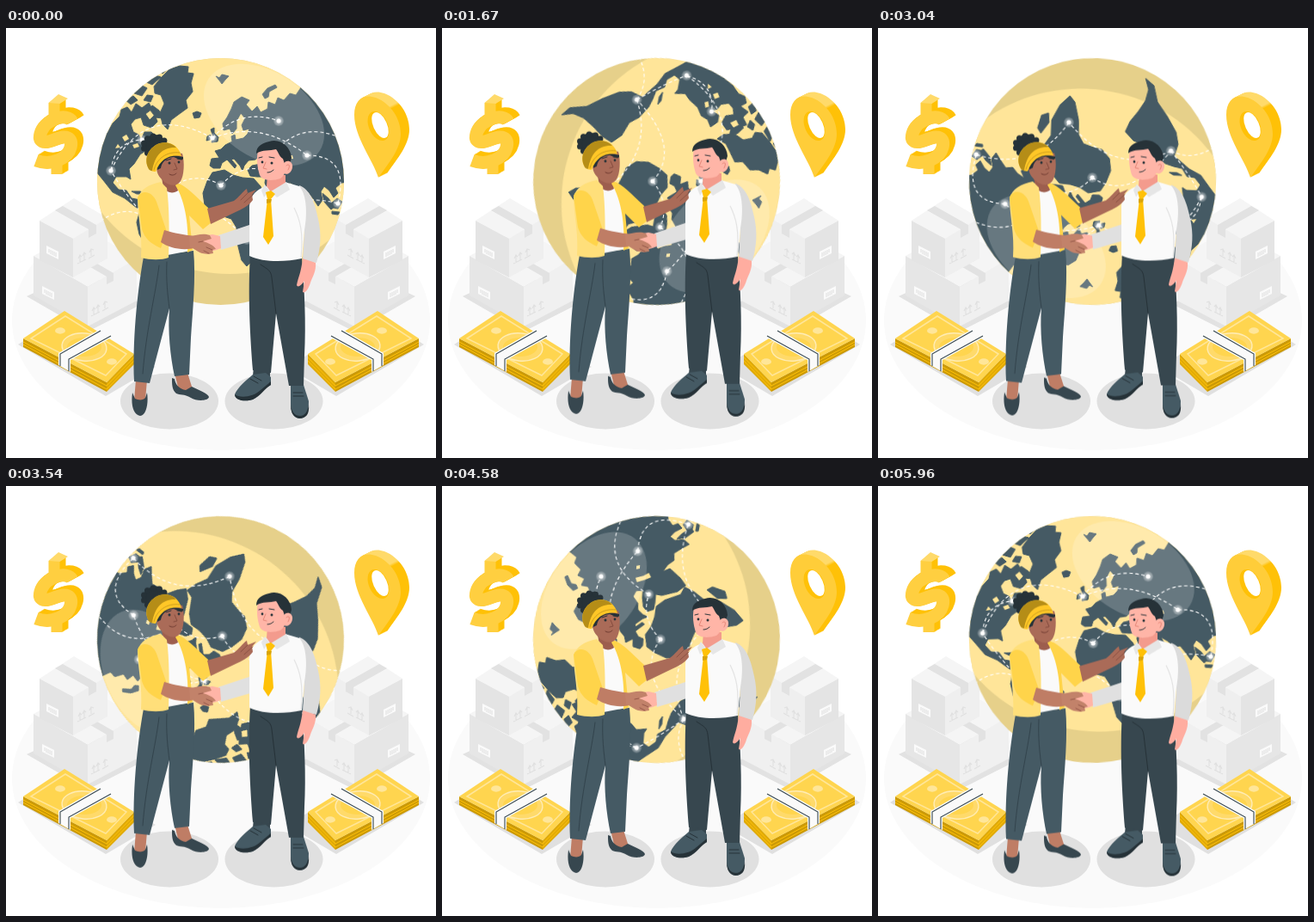
These frames come from a looping animation (500x500 px, 6000 ms). An HTML page:

```html
<!DOCTYPE html>
<html lang="en">
<head>
<meta charset="utf-8">
<title>Global trade handshake</title>
<style>
  html, body { margin: 0; width: 100%; height: 100%; overflow: hidden; background: #fff; }
  svg { display: block; width: 100vw; height: 100vh; }
  #globe { transform-origin: 249.5px 178.5px; }
  .land { fill: #455a64; stroke: #455a64; stroke-width: 1; stroke-linejoin: round; }
  .arc { fill: none; stroke: #fff; stroke-width: 1.1; stroke-dasharray: 4 3; }
  .line { fill: none; stroke: #263238; stroke-width: 1; stroke-linecap: round; stroke-linejoin: round; }
  .bold { fill: none; stroke-linecap: butt; stroke-linejoin: round; stroke-width: 15; }
</style>
</head>
<body>
<svg viewBox="0 0 500 500">
  <defs>
    <clipPath id="disc"><circle cx="249.5" cy="178.5" r="143.5"/></clipPath>
    <radialGradient id="glow">
      <stop offset="0" stop-color="#fff" stop-opacity=".85"/>
      <stop offset=".45" stop-color="#fff" stop-opacity=".5"/>
      <stop offset="1" stop-color="#fff" stop-opacity=".12"/>
    </radialGradient>
    <linearGradient id="pinSide" x1="0" y1="0" x2=".6" y2="1">
      <stop offset=".42" stop-color="#ffda6a"/>
      <stop offset=".46" stop-color="#ffc107"/>
    </linearGradient>
    <g id="marker">
      <circle r="6" fill="url(#glow)"/>
      <circle r="2.5" fill="#fff"/>
    </g>
    <g id="dollar" class="bold">
      <path d="M77 109C71 98 47 106 41 120C36 133 44 135 56 130C70 124 78 127 75 139C72 151 54 161 35 154"/>
      <path d="M56 87V105M59 150V170" stroke-width="13"/>
    </g>
    <path id="pin" d="M433 174C427 154 405 127 405 101C405 83 416 76 430 81C448 88 459 106 459 123C459 140 446 156 433 174Z"/>
    <g id="arrows" fill="none" stroke="#e0e0e0" stroke-width="1.1">
      <path d="M-8 5V-3M-10 0L-8 -4L-6 -2M-3 2V-6M-5 -3L-3 -7L-1 -5M5 -3V-11M3 -7L5 -11L8 -10M2 0L9 -4M-11 6L-1 1"/>
    </g>
    <g id="label">
      <path d="M-7 -8L7 -1V8L-7 1Z" fill="#fafafa"/>
      <path d="M-4 -4V0M-2 -3V2M0 -2V3M2 -1V4M4 0V5" stroke="#ddd" stroke-width=".9"/>
    </g>
    <g id="boxes">
      <path d="M24 312L95 353L158 321L88 282Z" fill="#e2e2e2"/>
      <path d="M32 265L92 233L152 268L95 301Z" fill="#f5f5f5"/>
      <path d="M32 265L95 301V347L32 311Z" fill="#e6e6e6"/>
      <path d="M95 301L152 268V317L95 347Z" fill="#f0f0f0"/>
      <path d="M55 253L63 249L125 285V294L117 298V289Z" fill="#e2e2e2"/>
      <use href="#label" x="49" y="308"/>
      <use href="#arrows" x="110" y="329"/>
      <path d="M39 224L79 198L118 221L78 245Z" fill="#f5f5f5"/>
      <path d="M39 224L78 245V290L39 270Z" fill="#e4e4e4"/>
      <path d="M78 245L118 221V268L78 290Z" fill="#efefef"/>
      <path d="M57 212L66 207L105 229V239L96 244V234Z" fill="#e2e2e2"/>
      <use href="#label" x="54" y="261"/>
      <use href="#arrows" x="94" y="268"/>
    </g>
    <g id="money">
      <path d="M14 368L68 334L174 394L116 428Z" fill="#e0e0e0"/>
      <path d="M20 361L117 412V423L20 371Z" fill="#cc9a06"/>
      <path d="M117 412L149 379V391L117 423Z" fill="#e0aa07"/>
      <path d="M20 365L117 416L149 383M20 368L117 420L149 387" fill="none" stroke="#ffc107" stroke-width="1"/>
      <path d="M20 361L68 329L149 379L117 412Z" fill="#ffd54f"/>
      <path d="M29 361L69 335L140 379L116 404Z" fill="none" stroke="#ffe699" stroke-width="1.5"/>
      <ellipse cx="91" cy="371" rx="26" ry="16" transform="rotate(6 91 371)" fill="#ffda6a" stroke="#ffecb3" stroke-width="1.5"/>
      <ellipse cx="91" cy="371" rx="20" ry="11" fill="#ffd54f"/>
      <ellipse cx="63" cy="352" rx="6" ry="3.700" fill="#ffe699"/>
      <ellipse cx="123" cy="388" rx="6" ry="3.700" fill="#ffe699"/>
      <path d="M108 351L124 359L75 386V400L61 392V378Z" fill="#fafafa"/>
      <path d="M110 352L63 379V393M122 358L73 385V399" fill="none" stroke="#37474f" stroke-width="1.1"/>
    </g>
  </defs>

  <ellipse cx="250" cy="340" rx="243" ry="151" fill="#fafafa"/>
  <use href="#boxes"/>
  <use href="#boxes" transform="matrix(-1 0 0 1 500 0)"/>

  <g id="globe">
    <circle cx="249.5" cy="178.5" r="143.5" fill="#e6d08a"/>
    <g clip-path="url(#disc)">
      <circle cx="260" cy="95" r="191" fill="#ffe599"/>
      <g class="land">
        <path d="M104 132L118 122L124 111L132 103L134 95L141 92L146 98L151 88L158 93L166 87L170 94L162 100L167 107L173 101L176 109L169 116L160 113L157 104L150 106L145 112L148 121L154 124L157 130L161 121L169 121L176 128L168 133L165 141L156 147L149 158L143 164L145 176L140 173L128 173L124 180L131 188L140 189L146 198L156 200L166 203L180 212L188 222L204 228L214 238L209 250L200 262L192 275L189 288L193 301L183 293L178 274L166 258L155 240L152 226L156 212L148 206L138 198L124 191L113 177L104 166Z"/>
        <path d="M172 68L180 58L190 48L202 44L212 45L211 52L218 53L215 64L217 74L209 84L211 93L200 101L192 107L188 118L182 112L179 99L184 88L180 78L173 76Z"/>
        <path d="M149 76L156 66L164 70L158 79ZM163 63L173 55L180 57L170 66ZM164 78L171 79L168 86L160 84ZM139 84L148 79L153 84L145 89ZM170 90L178 96L181 105L174 104L168 96ZM178 50L187 43L190 46L182 53Z"/>
        <path d="M217 99L222 97L227 99L225 104L219 105ZM244 56L248 58L251 54L259 56L255 60L251 65L248 61ZM301 82L298 77L304 70L313 66L315 69L306 74L305 80ZM146 190L156 190L161 193L152 193Z"/>
        <path d="M238 118L242 116L242 122L247 127L246 132L239 133L241 127ZM234 126L238 124L237 130L233 131ZM304 256L303 245L312 232L316 238L312 253Z"/>
        <path d="M253 119L252 111L257 104L262 94L265 86L274 80L283 84L279 89L286 97L292 91L296 98L304 94L305 86L313 89L316 81L323 84L330 76L337 78L343 69L404 100V178L390 180L383 186L386 192L381 197L376 189L370 184L366 190L368 200L363 207L357 198L351 190L343 191L337 184L329 179L333 187L323 200L315 207L307 198L301 180L302 173L292 173L284 172L281 165L286 160L296 158L305 158L304 150L297 147L290 153L282 154L277 160L275 166L272 160L265 152L262 153L268 160L266 163L257 153L251 157L249 163L241 163L237 160L239 152L248 151L243 143L250 141L255 136L263 132L262 126L266 124L267 130L276 128L281 123L283 117L276 119L274 113L278 105L273 99L268 108L268 117L263 123L260 117Z"/>
        <path d="M368 192L375 198L382 208L378 211L370 202ZM379 203L385 198L391 202L386 210L381 209ZM379 213L388 214L386 217L379 216Z"/>
        <path d="M240 168L254 165L264 171L275 174L288 175L296 184L304 202L313 206L308 218L300 230L300 248L291 266L280 277L274 270L269 250L268 232L262 222L250 218L240 216L231 206L229 192L234 178Z"/>
      </g>
      <path d="M135 127l5 -3l3 5l-5 3zM147 136l6 -2l2 4l-6 2zM127 140l3 -5l3 4zM314 150l5 -2l3 9l4 6l-5 3l-4 -8zM329 148l4 0l1 4l-4 0z" fill="#ffe599"/>
      <ellipse cx="300" cy="101" rx="77" ry="50" transform="rotate(33 300 101)" fill="#fff" opacity=".18"/>
      <g id="routes"></g>
    </g>
  </g>

  <g id="dollarSide" stroke="#ffc107"></g>
  <use href="#dollar" stroke="#ffcf40"/>
  <path d="M49.500 87L61 77L72 82L62.500 88Z" fill="#ffda6a"/>

  <g id="pinBack" fill="url(#pinSide)"></g>
  <use href="#pin" fill="#ffcd39"/>
  <ellipse cx="433" cy="114" rx="11" ry="18" transform="rotate(-24 433 114)" fill="#ffc107"/>
  <ellipse cx="435" cy="113" rx="8" ry="16" transform="rotate(-24 435 113)" fill="#fff"/>

  <use href="#money"/>
  <use href="#money" transform="matrix(-1 0 0 1 500 0)"/>

  <ellipse cx="190" cy="434" rx="57" ry="32.5" fill="#e0e0e0"/>
  <ellipse cx="311.500" cy="434" rx="57" ry="32.500" fill="#e0e0e0"/>

  <g id="people">
    <!-- man: legs -->
    <path d="M288 394H307V408L286 415Z" fill="#37474f"/>
    <path d="M287 403C280 409 269 418 266 426C266 433 278 435 287 432C296 427 299 419 308 415V406L302 401Z" fill="#455a64"/>
    <path d="M266 426C272 431 288 429 296 421L308 411V415C301 419 296 428 287 432C278 435 266 433 266 426Z" fill="#263238"/>
    <path d="M331 415H346L352 434C352 447 349 454 341 454C333 453 331 445 331 437Z" fill="#455a64"/>
    <path d="M331 437C332 447 336 451 342 451C348 451 351 445 352 438C353 449 349 454 341 454C333 453 331 445 331 437Z" fill="#263238"/>
    <path d="M284 408l9 5M288 405l9 5M334 424h11M334 428h12" class="line"/>
    <path d="M284 263L344 267C347 300 349 345 347 380L346 416H329L314 332L308 401L287 398C284 360 281 310 284 263Z" fill="#37474f"/>
    <path d="M296 275C305 281 308 282 309 290L314 332" class="line"/>
    <!-- man: far arm and torso -->
    <path d="M285 222L283 229L247 241L250 258L288 247Z" fill="#e0e0e0"/>
    <path d="M341 183C354 188 359 203 363 222C367 240 366 255 361 273L345 270L347 235L338 205Z" fill="#dbdbdb"/>
    <path d="M345 268L360 273C361 283 356 290 354 296C352 303 348 309 345 307L347 294C343 300 339 302 338 299C340 289 343 285 345 268Z" fill="#ffada0"/>
    <path d="M303 184C292 187 284 194 283 207V265C300 273 325 272 344 268L347 235C351 214 349 192 341 184L324 179Z" fill="#fafafa"/>
    <path d="M335 209C342 223 346 238 343 267" fill="none" stroke="#e3e3e3" stroke-width="1.2"/>
    <path d="M304 171H325V183L308 191L303 184Z" fill="#f39b8d"/>
    <path d="M301 182L306 189L300 197L297 189ZM308 190L326 179L330 188L315 197Z" fill="#e6e6e6"/>
    <path d="M302 191L308 189L313 193L308 199L311 242L305 252L299 243L304 199Z" fill="#ffc107"/>
    <path d="M303 199L309 199L308 203L303 204Z" fill="#d9a406"/>
    <!-- man: head -->
    <path d="M293 143C298 136 316 133 325 145C330 156 326 170 319 175C310 178 298 178 295 171C292 162 291 151 293 143Z" fill="#ffb5a7"/>
    <path d="M291 146C291 137 298 134 306 132C319 128 331 138 332 151L330 158L325 161L322 152C318 150 316 143 314 141C307 143 298 141 291 146Z" fill="#263238"/>
    <path d="M322 159C325 152 334 154 333 162C332 169 326 172 322 168Z" fill="#ffb5a7"/>
    <path d="M326 160C329 157 331 160 328 165" class="line" style="stroke:#e58678"/>
    <circle cx="298" cy="156" r="1.4" fill="#263238"/>
    <circle cx="309" cy="157" r="1.5" fill="#263238"/>
    <path d="M294 151L298 150M306 150L312 151M304 168C307 168 309 167 311 165" class="line"/>
    <path d="M302 156L299 163L303 164" class="line" style="stroke:#e58678"/>

    <!-- woman: legs -->
    <path d="M151 409H164L162 433H149ZM196 401L211 401L217 420L201 422Z" fill="#bf7d65"/>
    <path d="M147 424L150 431C154 433 160 433 162 430L164 424C166 436 163 451 156 451C148 450 145 438 147 424Z" fill="#37474f"/>
    <path d="M193 407L196 408C197 415 202 420 209 421L216 417C224 421 235 425 236 429C235 434 221 434 215 430C207 425 202 427 198 425C193 421 193 414 193 407Z" fill="#37474f"/>
    <path d="M160 266L218 259C221 290 217 330 215 360L213 403L196 405C191 382 188 352 190 326L167 413L149 411C147 365 152 310 160 266Z" fill="#455a64"/>
    <path d="M187 272C186 294 188 310 190 326M178 276C174 310 163 350 159 402" class="line" style="stroke:#33444d"/>
    <!-- woman: torso -->
    <path d="M181 181L201 180L212 196L214 259L188 264Z" fill="#fafafa"/>
    <path d="M181 174L198 177L200 189C195 193 187 192 183 186Z" fill="#9d5e4e"/>
    <path d="M199 180C210 184 220 195 235 209L239 226L229 234L213 218L217 258L211 261C213 232 209 202 197 183Z" fill="#ffd44a"/>
    <path d="M180 179C166 182 156 187 153 199C153 218 159 240 157 267C168 270 181 270 189 267C190 236 190 209 187 186Z" fill="#ffdf7a"/>
    <path d="M153 197C158 187 170 190 175 202L187 237L180 256C168 251 161 244 158 234Z" fill="#ffd44a"/>
    <path d="M184 235C196 239 207 240 218 242L223 254C211 260 191 257 180 249Z" fill="#bf7d65"/>
    <!-- arm on the shoulder -->
    <path d="M234 210L265 201C271 197 275 190 280 187L281 192L291 188L286 194L287 200C282 207 274 211 267 214L238 228Z" fill="#aa6b58"/>
    <path d="M281 192L273 200M287 194L277 203" class="line" style="stroke:#8c5244"/>
    <!-- handshake -->
    <path d="M249 242L240 240L229 242L219 249L222 257L233 261L245 258L250 256Z" fill="#ffb5a7"/>
    <path d="M213 242C222 241 229 238 237 241L239 245L229 248C235 250 241 252 244 257L240 258L241 262L235 263L228 262C222 260 219 256 214 255Z" fill="#c2826a"/>
    <path d="M229 248L224 249M233 255L240 258M230 259L236 262" class="line" style="stroke:#96594a"/>
    <!-- woman: head -->
    <g id="curls" fill="#263238"></g>
    <path d="M176 158C179 149 190 144 205 146C208 156 207 172 203 178C199 185 189 184 182 177C176 171 174 166 176 158Z" fill="#aa6b58"/>
    <path d="M176 165C174 157 181 149 190 147L206 150C207 156 200 152 195 150C185 151 181 157 180 163Z" fill="#263238"/>
    <path d="M165 162C160 150 167 138 179 134C192 131 201 138 204 149C190 147 180 152 174 167C170 167 167 166 165 162Z" fill="#ffc727"/>
    <path d="M165 162C160 150 167 138 179 134C187 132 193 134 198 139C183 138 173 147 170 166C168 166 166 165 165 162Z" fill="#b58d17"/>
    <path d="M172 165C175 152 187 143 202 145" class="line" style="stroke:#cc9f1f"/>
    <circle cx="190" cy="157" r="1.5" fill="#263238"/>
    <circle cx="201" cy="156" r="1.4" fill="#263238"/>
    <path d="M186 154L192 152M199 152L204 153" class="line"/>
    <path d="M196 157L199 164L195 165" class="line" style="stroke:#854c3f"/>
    <path d="M190 170C193 172 196 171 198 169" class="line" style="stroke:#6f3b31"/>
  </g>
</svg>
<script>
  const $ = id => document.getElementById(id);

  const cities = {
    west: [122, 166], east: [158, 130], isle: [240, 128], north: [317, 108], steppe: [350, 148],
    coast: [386, 204], sahara: [250, 183], cape: [280, 246], south: [160, 218], gulf: [301, 165]
  };
  // from, to, control point of the curve
  const routes = [
    ['west', 'isle', 160, 84], ['west', 'east', 126, 132], ['isle', 'north', 272, 92],
    ['isle', 'steppe', 296, 106], ['steppe', 'coast', 400, 148], ['sahara', 'south', 206, 156],
    ['south', 'cape', 224, 184], ['cape', 'coast', 318, 186], ['sahara', 'gulf', 272, 158],
    ['south', 'west', 136, 190]
  ];
  $('routes').innerHTML =
    routes.map(([a, b, x, y]) => `<path class="arc" d="M${cities[a]}Q${x} ${y} ${cities[b]}"/>`).join('') +
    '<path class="arc" d="M160 218Q134 206 108 226M301 165Q332 100 394 130"/>' +
    Object.values(cities).map(([x, y]) => `<use href="#marker" x="${x}" y="${y}"/>`).join('');

  const extrude = (id, shape, depth, slope) => {
    for (let d = depth; d > 0; d--)
      $(id).innerHTML += `<use href="#${shape}" x="${d}" y="${-d * slope}"/>`;
  };
  extrude('dollarSide', 'dollar', 7, 0.6);
  extrude('pinBack', 'pin', 10, 0.5);

  // bun: a ring of small curls around a solid middle
  let curls = '<circle cx="173" cy="137" r="13"/>';
  for (let i = 0; i < 11; i++) {
    const a = i * Math.PI * 2 / 11;
    curls += `<circle cx="${173 + 13 * Math.cos(a)}" cy="${137 + 11 * Math.sin(a)}" r="3.5"/>`;
  }
  $('curls').innerHTML = curls;

  const loop = (id, frames, duration) =>
    $(id).animate(frames.map(transform => ({ transform })), { duration, iterations: Infinity });
  loop('globe', ['rotate(0deg)', 'rotate(360deg)'], 6000);
  loop('people', ['translateY(0px)', 'translateY(-10px)', 'translateY(0px)'], 1500);
</script>
</body>
</html>
```
